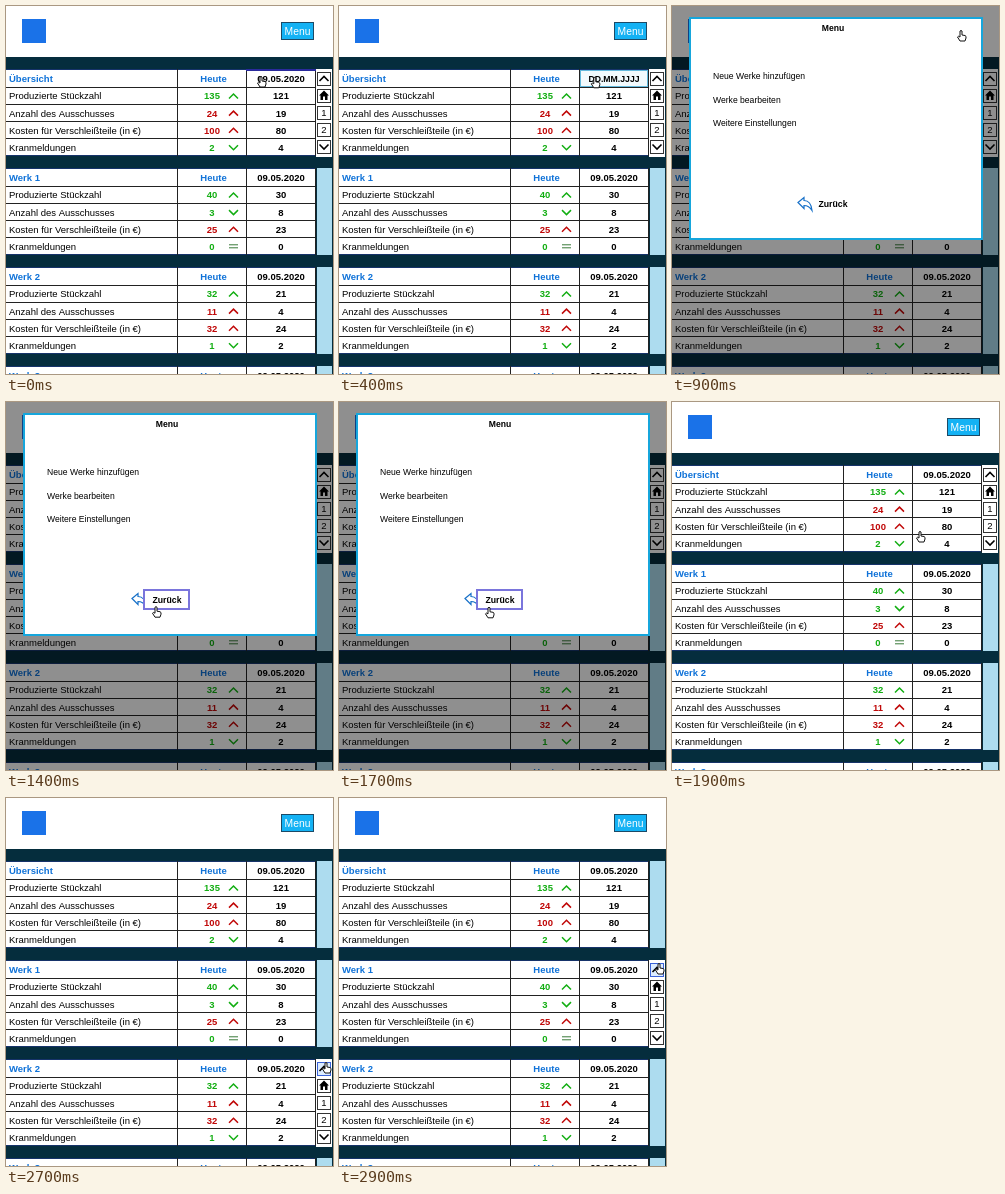
An HTML page with a canvas for the animation above (3 s loop, 327 px wide and 368 px high).

```html
<!DOCTYPE html>
<html lang="de">
<head>
<meta charset="utf-8">
<style>
html, body { margin: 0; overflow: hidden; background: #fff; }
canvas { display: block; }
</style>
</head>
<body>
<canvas id="stage" width="327" height="368"></canvas>
<script>
const ctx = document.getElementById('stage').getContext('2d');
const LOOP = 3000, STEP = 100, TABLE_STEP = 99, TABLE_TOP = 63;
const GREEN = '#12ae12', RED = '#c00808', BLUE = '#0f72d8', INK = '#000';
const labels = ['Produzierte Stückzahl', 'Anzahl des Ausschusses',
  'Kosten für Verschleißteile (in €)', 'Kranmeldungen'];
// Each row: today, trend, reference day, colour
const tables = [
  ['Übersicht', [135, 'up', 121, GREEN], [24, 'up', 19, RED], [100, 'up', 80, RED], [2, 'down', 4, GREEN]],
  ['Werk 1', [40, 'up', 30, GREEN], [3, 'down', 8, GREEN], [25, 'up', 23, RED], [0, 'same', 0, GREEN]],
  ['Werk 2', [32, 'up', 21, GREEN], [11, 'up', 4, RED], [32, 'up', 24, RED], [1, 'down', 2, GREEN]],
  ['Werk 3']
];
// Pointer stops: time, x, y
const path = [[0, 256, 76], [500, 257, 77], [800, 290, 28], [900, 290, 30], [1000, 290, 31],
  [1300, 151, 210], [1800, 151, 211], [1900, 249, 135], [2300, 320, 122], [2400, 321, 122],
  [2500, 321, 124], [2600, 321, 269], [2700, 321, 270], [2800, 321, 172], [3000, 321, 170]];

function rect(x, y, w, h, fill, stroke, width = 1) {
  if (fill) { ctx.fillStyle = fill; ctx.fillRect(x, y, w, h); }
  if (stroke) {
    ctx.strokeStyle = stroke;
    ctx.lineWidth = width;
    ctx.strokeRect(x + width / 2, y + width / 2, w - width, h - width);
  }
}

function text(str, x, y, { color = INK, bold = false, size = 9.5, align = 'left' } = {}) {
  ctx.font = `${bold ? 'bold ' : ''}${size}px "Liberation Sans", Arial, sans-serif`;
  ctx.fillStyle = color;
  ctx.textAlign = align;
  ctx.fillText(str, x, y + size * 0.36);
}

function shape(d, x, y, stroke, width, fill) {
  const p = new Path2D(d);
  ctx.save();
  ctx.translate(x, y);
  if (fill) { ctx.fillStyle = fill; ctx.fill(p); }
  if (stroke) { ctx.strokeStyle = stroke; ctx.lineWidth = width; ctx.stroke(p); }
  ctx.restore();
}

const trends = {
  up: 'M-4.5 2.5L0-2L4.5 2.5',
  down: 'M-4.5-2L0 2.5L4.5-2',
  same: 'M-4.5-1.5H4.5M-4.5 1.5H4.5'
};

function drawTable([title, ...rows], top, dateState) {
  const center = { bold: true, align: 'center' };
  rect(0, top, 310, 87, '#fff');
  rect(311, top, 15, 87, '#addcef');
  [0, 18, 35, 52, 69, 86].forEach(dy => rect(0, top + dy, 310, 1, dy % 86 ? '#222' : '#16336a'));
  [171, 240, 309].forEach(x => rect(x, top, 1, 87, '#222'));

  const editing = dateState === 'edit';
  if (dateState === 'focus') rect(240, top, 70, 2, '#2a2a9c');
  if (editing) rect(241, top + 1, 68, 17, '#f2fafd', '#63b9dc');
  text(title, 3, top + 9.5, { color: BLUE, bold: true });
  text('Heute', 207.5, top + 9.5, { ...center, color: BLUE });
  text(editing ? 'DD.MM.JJJJ' : '09.05.2020', 275, top + 9.5, { ...center, size: editing ? 8.7 : 9.5 });

  rows.forEach(([today, trend, before, color], i) => {
    const y = top + 27 + i * 17.1;
    text(labels[i], 3, y);
    text(today, 206, y, { ...center, color });
    if (trend === 'same') shape(trends.same, 227.5, y, '#3a7a3a', 1);
    else shape(trends[trend], 227.5, y, color, 1.5);
    text(before, 275, y, center);
  });
}

function drawPanel(top, active) {
  rect(310, top, 16, 88, '#fff');
  for (let i = 0; i < 5; i++) {
    const y = top + 9.5 + i * 17;
    rect(311, Math.round(y - 7), 14, 14, i === active ? '#dcecff' : '#fff', i === active ? '#3a62d8' : '#333');
    if (i === 0 || i === 4) shape(trends[i ? 'down' : 'up'], 318, y, INK, 1.6);
    else if (i === 1) shape('M-5 0L0-5L5 0H3.5V4.5H1V1H-1V4.5H-3.5V0Z', 318, y, null, 0, INK);
    else text(i - 1, 318, y, { align: 'center' });
  }
}

function drawMenu(focused) {
  rect(0, 0, 327, 368, 'rgba(0,0,0,.44)');
  rect(17, 11, 294, 223, '#fff', '#16a6dc', 2);
  text('Menu', 161, 21.5, { bold: true, size: 8.6, align: 'center' });
  ['Neue Werke hinzufügen', 'Werke bearbeiten', 'Weitere Einstellungen']
    .forEach((item, i) => text(item, 41, 70 + i * 23.7, { size: 8.6 }));
  shape('M0 5L6 0V3Q13 3 14 13Q11 8 6 8V11Z', 126, 191.5, '#1670c8', 1.2, '#fff');
  if (focused) rect(137, 187, 47, 21, '#fff', '#7a75dc', 2);
  text('Zurück', 146.5, 197.5, { bold: true, size: 8.7 });
}

function drawPointer(t) {
  const i = path.findIndex(p => p[0] > t);
  const [t0, x0, y0] = path[i - 1], [t1, x1, y1] = path[i];
  const k = (t - t0) / (t1 - t0);
  shape('M-2-5Q-1-6 0-5V-1L3-.5Q4.5 0 4 2L3 5H-2L-4.5 1Q-4-.5-2 1Z',
    x0 + (x1 - x0) * k, y0 + (y1 - y0) * k, '#111', 1, '#fff');
}

function draw(t) {
  rect(0, 0, 327, 368, '#fff');
  rect(0, 51, 327, 317, '#052d3d');
  rect(16, 13, 24, 24, '#1a72e8');
  rect(275, 16, 33, 18, '#14b2f4', '#1c4a66');
  text('Menu', 291.5, 25, { color: '#fff', size: 10.3, align: 'center' });

  const dateState = t < 200 ? 'focus' : t < 600 ? 'edit' : '';
  tables.forEach((table, i) => drawTable(table, TABLE_TOP + i * TABLE_STEP, i ? '' : dateState));

  // "2" sends the panel to the third table, the up button brings it back by one
  const section = t < 2500 ? 0 : t < 2800 ? 2 : 1;
  const active = t < 2300 ? -1 : t < 2500 ? 3 : t < 2600 ? -1 : 0;
  drawPanel(TABLE_TOP + section * TABLE_STEP, active);
  if (t >= 800 && t < 1900) drawMenu(t >= 1300);
  drawPointer(t);
}

function tick(now) {
  draw(Math.floor(now % LOOP / STEP) * STEP);
  requestAnimationFrame(tick);
}
requestAnimationFrame(tick);
</script>
</body>
</html>
```
